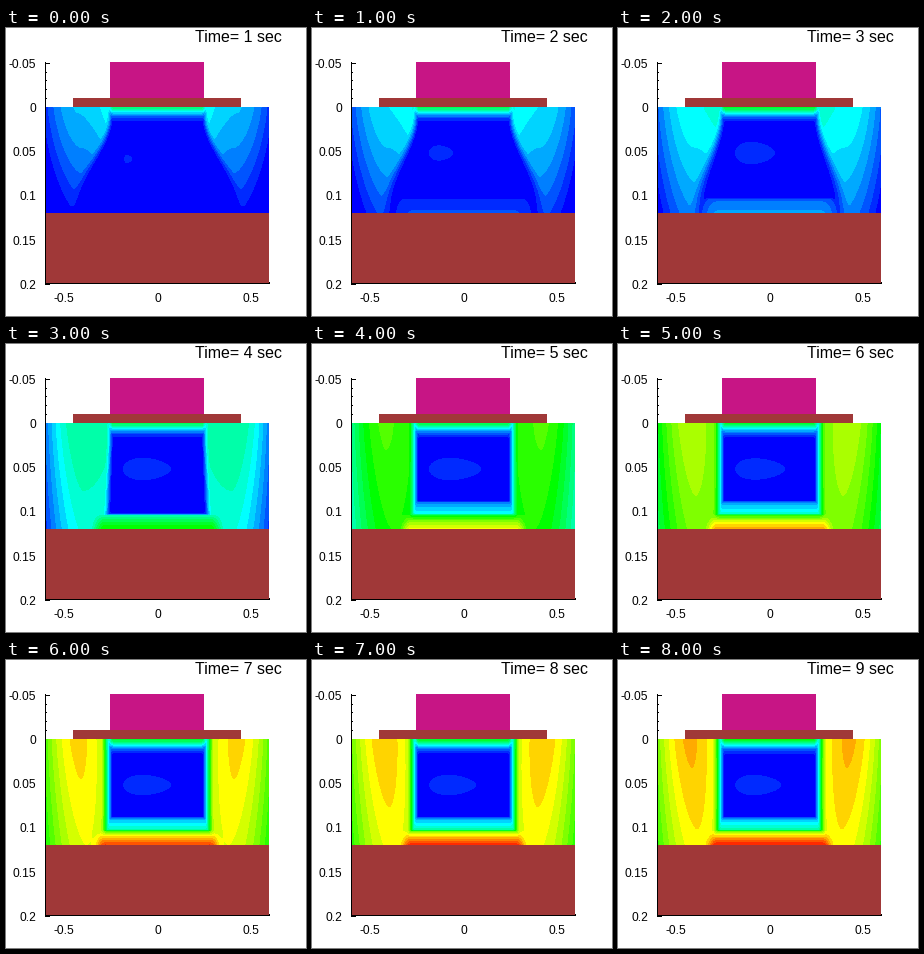
Recreate the animation shown at these times as a matplotlib script. Size 300x288 px, loop 9000 ms.

```python
import colorsys

import matplotlib.pyplot as plt
import numpy as np
from matplotlib.animation import FuncAnimation
from matplotlib.colors import ListedColormap
from matplotlib.patches import Rectangle

W, H, DPI = 300, 288, 100
LEFT, RIGHT, TOP, BOTTOM = 40, 263, 79, 185
MID = 151.5
LEVELS = 25
BROWN, PINK = "#a03838", "#c71585"

# Shape of the heat field at a few key seconds
KEYS = [1, 3, 4, 5, 7, 9]
PARAMS = {
    "peak":   [5.1, 6.8, 8.9, 14.2, 19.4, 20.3],
    "edge":   [1.6, 2.8, 3.2, 9.2, 14.4, 15.3],
    "drop":   [3.8, 2.8, 1.6, 1.2, 1.4, 1.6],
    "inner":  [-1.5, -0.8, 0.6, 1.4, 3.2, 3.6],
    "slope":  [29, 17, 2, 0, 0, 0],
    "width":  [7, 8, 8, 12, 14, 14],
    "blur":   [10, 14, 2, 0, 0, 0],
    "roof":   [9.5, 11.5, 10.5, 10.8, 11.5, 12.2],
    "floor":  [0, 4.2, 13.0, 18.4, 23.2, 24.2],
    "tail":   [0.08, 0.08, 0.08, 0.38, 0.36, 0.36],
    "spot":   [4, 20, 24, 26, 24, 23],
    "spot_h": [4, 11, 11, 11, 10, 10],
}


def smooth(a, b, x):
    u = np.clip((x - a) / (b - a), 0, 1)
    return u * u * (3 - 2 * u)


def blend(a, b, n):
    """Rounded maximum."""
    return (a ** n + b ** n) ** (1 / n)


X, Y = np.meshgrid(np.arange(LEFT, RIGHT) + 0.5, np.arange(TOP, BOTTOM) + 0.5)
XA = abs(X - MID)
DEPTH = (Y - TOP) / (BOTTOM - TOP)


def heat(sec):
    p = {k: np.interp(sec, KEYS, v) for k, v in PARAMS.items()}

    # warm lobes on both sides of the core
    ridge = 80 - 9 * DEPTH
    out = np.clip((XA - ridge) / (112 - ridge), 0, 1)
    inn = np.clip((ridge - XA) / 30, 0, 1)
    side = (p["peak"] - p["drop"] * DEPTH ** 1.3
            - (p["peak"] - p["edge"]) * out ** 1.8
            - p["inner"] * inn ** 1.8)
    wall = 43 + p["slope"] * smooth(0.1, 0.9, DEPTH)
    side = np.maximum(side, 0) * smooth(
        wall, wall + p["width"] + p["blur"] * DEPTH, XA)

    # strips along the upper and lower plates
    roof = p["roof"] * np.exp(-((Y - TOP) / 8.5) ** 1.7) * smooth(54, 44, XA)
    floor = p["floor"] * np.interp(
        BOTTOM - Y, [0, 5, 10, 14, 15, 26, 29],
        [1, 0.91, 0.78, 0.62, p["tail"], 0.55 * p["tail"], 0])
    floor = floor * smooth(82, 52, XA)
    field = blend(blend(side, roof, 4), floor, 8)

    # faint patch inside the core
    cx = 117 + p["spot"] if sec > 1 else 122
    cy = 125 if sec > 1 else 131
    ry = p["spot_h"] * (1 - 0.2 * (X - cx) / p["spot"])
    patch = ((X - cx) / p["spot"]) ** 2 + ((Y - cy) / ry) ** 2 < 1
    field = np.where(patch, np.maximum(field, 1), field)
    return np.clip(np.floor(field), 0, LEVELS - 1)


def box(x0, y0, x1, y1, color, z=2):
    ax.add_patch(Rectangle((x0, y0), x1 - x0, y1 - y0, fc=color, lw=0,
                           antialiased=False, zorder=z))


def label(x, y, s, px, **kw):
    return ax.text(x, y, s, fontsize=px * 72 / DPI, family="Liberation Sans",
                   color="black", **kw)


def px_x(v):
    return round(MID + 186.5 * v)


def px_y(v):
    return round(TOP + 884 * v)


fig = plt.figure(figsize=(W / DPI, H / DPI), dpi=DPI, facecolor="white")
ax = fig.add_axes([0, 0, 1, 1])

rainbow = ListedColormap([colorsys.hsv_to_rgb((240 - 10 * i) / 360, 1, 1)
                          for i in range(LEVELS)])
image = ax.imshow(heat(1), cmap=rainbow, vmin=-0.5, vmax=LEVELS - 0.5,
                  extent=(LEFT, RIGHT, BOTTOM, TOP), interpolation="nearest",
                  aspect="auto", zorder=1)
ax.set_xlim(0, W)
ax.set_ylim(H, 0)
ax.axis("off")

box(104, 34, 198, 70, PINK)
box(67, 70, 235, 79, BROWN)
box(LEFT, BOTTOM, RIGHT, 255, BROWN)

# axes; ticks lie under the filled areas
box(39, 34, 40, 256, "black")
box(39, 255, RIGHT, 256, "black")
for i in range(-5, 21):
    y, size = px_y(i / 100), 5 if i % 5 == 0 else 2
    box(39, y, 39 + size, y + 1, "black", 0)
for i in range(-6, 7):
    x, size = px_x(i / 10), 5 if i % 5 == 0 else 2
    box(x, 256 - size, x + 1, 256, "black", 0)
for v in (-0.05, 0, 0.05, 0.1, 0.15, 0.2):
    label(30, px_y(v) + 0.5, f"{v:g}", 12, ha="right", va="center_baseline")
for v in (-0.5, 0, 0.5):
    label(px_x(v) - 0.5, 274.5, f"{v:g}", 12, ha="center", va="baseline")

title = label(189, 14.5, "", 16, ha="left", va="baseline")


def update(i):
    image.set_data(heat(i + 1))
    title.set_text(f"Time= {i + 1} sec")
    return image, title


anim = FuncAnimation(fig, update, frames=9, interval=1000, repeat=True,
                     repeat_delay=0)
plt.show()
```
